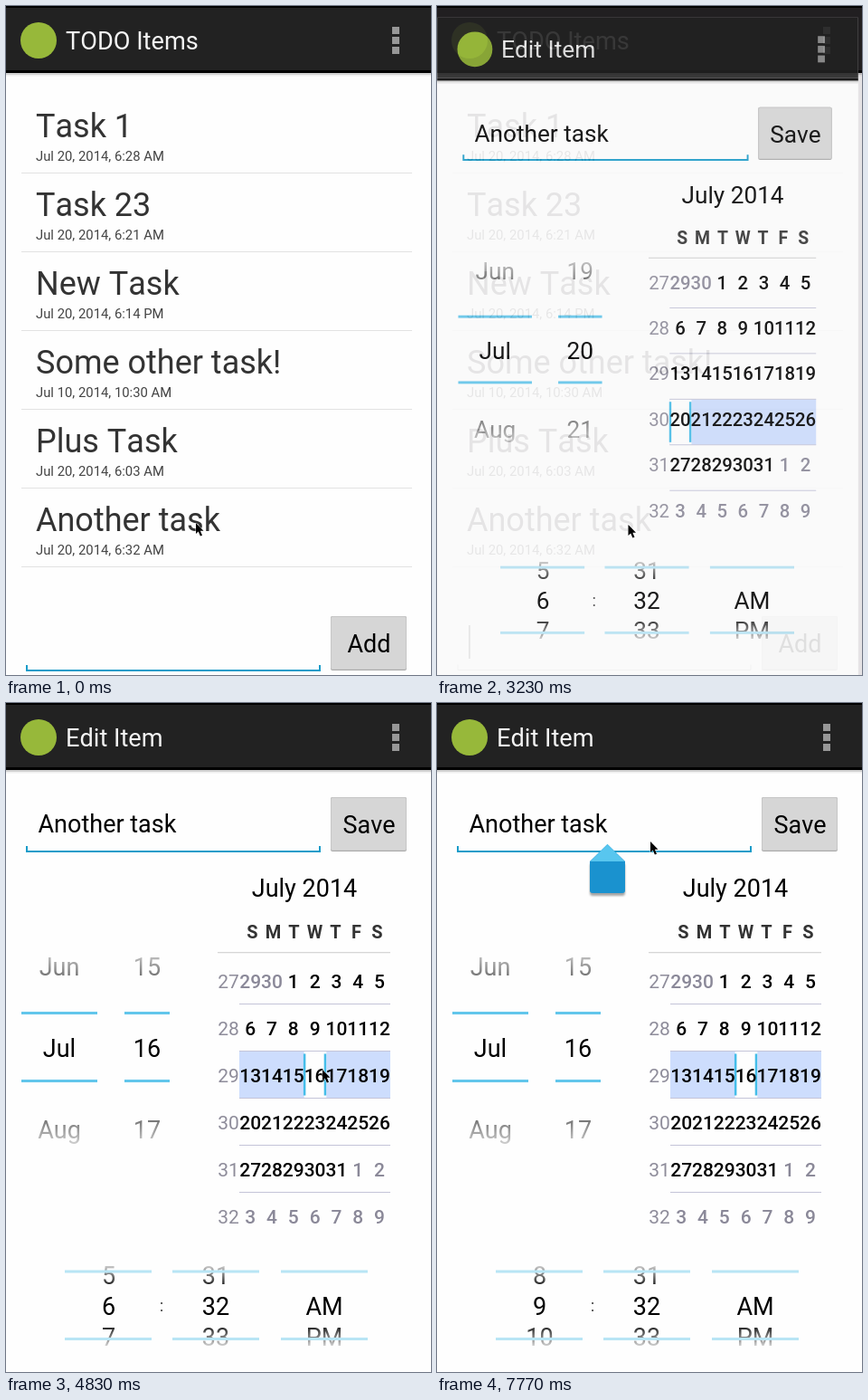
Animation, 470 px wide and 739 px high, one loop 8 s. Source, as an HTML page:

```html
<!DOCTYPE html>
<html lang="en">
<head>
<meta charset="utf-8">
<title>TODO Items</title>
<style>
html, body { margin: 0; width: 100%; height: 100%; overflow: hidden; background: #fefefe; }
svg { display: block; width: 100vw; height: 100vh; }
text { font-family: Roboto, sans-serif; font-size: 27px; font-kerning: none; fill: #000; white-space: pre; }
.title { font-size: 27.2px; fill: #f3f3f3; }
.task { font-size: 36px; fill: #333; }
.date { font-size: 14.85px; fill: #444; }
.day { font-size: 21px; font-weight: 500; }
.week { font-size: 21px; fill: #8e8c9a; }
.head { font-size: 20px; font-weight: 700; fill: #333; }
.mid { text-anchor: middle; }
</style>
</head>
<body>
<svg id="stage" viewBox="0 0 470 739" xmlns="http://www.w3.org/2000/svg"></svg>
<script>
const LOOP = 8000;
const range = n => [...Array(n).keys()];
const rect = (x, y, w, h, fill, more = '') =>
  `<rect x="${x}" y="${y}" width="${w}" height="${h}" fill="${fill}" ${more}/>`;
const text = (x, y, str, cls = '', more = '') =>
  `<text x="${x}" y="${y}" class="${cls}" ${more}>${str}</text>`;

// The phone screen is 480 wide and a little larger than the stage
const screenBack = () => rect(-7, 2, 480, 762, '#fefefe');

const header = title =>
  rect(-7, 2, 480, 69, '#222') + rect(-7, 71, 480, 3, '#000') +
  rect(-7, 74, 480, 2, '#d2d2d2') + rect(-7, 76, 480, 1.5, '#f0f0f0') +
  '<circle cx="36" cy="38" r="20" fill="#97b83a"/>' +
  text(66, 48, title, 'title') +
  [23, 34, 45].map(y => rect(427, y, 8, 8, '#979797')).join('');

const button = (y, label) =>
  rect(359, y, 84, 60, '#a9a9a9', 'rx="2"') +
  rect(359, y, 84, 59, '#c6c6c6', 'rx="2"') +
  rect(360, y + 1, 82, 57.5, '#d6d6d6', 'rx="1"') +
  text(401.5, y + 40, label, 'mid');

const underline = (y, color, w, id) =>
  `<path id="${id}" d="M23 ${y - 6}V${y}H347V${y - 6}" fill="none" stroke="${color}" stroke-width="${w}"/>`;

const caret = (id, y) => rect(35.2, y, 1.4, 37, '#111', `id="${id}"`);

// Task list screen
const tasks = [
  ['Task 1', '20, 2014, 6:28 AM'],
  ['Task 23', '20, 2014, 6:21 AM'],
  ['New Task', '20, 2014, 6:14 PM'],
  ['Some other task!', '10, 2014, 10:30 AM'],
  ['Plus Task', '20, 2014, 6:03 AM'],
  ['Another task', '20, 2014, 6:32 AM']
];
const listScreen = () =>
  screenBack() + header('TODO Items') +
  tasks.map(([name, date], i) =>
    text(33, 145 + 87 * i, name, 'task') +
    text(33, 171 + 87 * i, 'Jul ' + date, 'date') +
    rect(17, 184 + 87 * i, 432, 1, '#e2e2e2')).join('') +
  underline(734, '#1a9cc9', 2, 'lineOn') +
  underline(733.5, '#b2b2b2', 1, 'lineOff') +
  caret('listCaret', 684) + button(674, 'Add');

// Edit screen
const dayCell = n => {
  const d = n - 1;
  return d < 1 ? [d + 30, 0] : d > 31 ? [d - 31, 0] : [d, 1];
};
const colX = c => 270.2 + 23.8 * c;

const calendar = () =>
  text(330, 214, 'July 2014', 'mid') +
  [...'SMTWTFS'].map((s, c) => text(272.5 + 23 * c, 260, s, 'head mid')).join('') +
  rect(234, 275, 191, 1.3, '#d6d6d6') +
  '<g id="band"></g>' +
  range(5).map(r => rect(258, 332 + 52 * r, 167, 1, '#c4c4d8')).join('') +
  '<g id="bars"></g><g id="days">' +
  range(6).map(r =>
    text(246, 315 + 52 * r, 27 + r, 'week mid') +
    range(7).map(c => {
      const [d, inside] = dayCell(r * 7 + c);
      return text(colX(c), 315 + 52 * r, d, 'day mid', inside ? '' : 'style="fill:#8a8898"');
    }).join('')).join('') + '</g>';

const dateWheels = () =>
  ['Jun', 'Jul', 'Aug'].map((m, i) => text(59, 300.5 + 90 * i, m, 'mid')).join('') +
  '<g id="dayWheel"></g>' +
  rect(15, 270, 170, 66, 'url(#fadeTop)') + rect(15, 426, 170, 66, 'url(#fadeBottom)') +
  [341, 416].map(y => rect(17, y, 84, 3, '#62c6eb') + rect(131, y, 50, 3, '#62c6eb')).join('');

const timeWheels = () =>
  '<g clip-path="url(#wheelClip)"><g id="hourWheel"></g>' +
  ['31', '32', '33'].map((m, i) => text(232, 641.5 + 34 * i, m, 'mid')).join('') +
  text(352, 675.5, 'AM', 'mid') + text(352, 709.5, 'PM', 'mid') +
  rect(60, 619, 345, 28, 'url(#fadeTop)') + rect(60, 685, 345, 27, 'url(#fadeBottom)') + '</g>' +
  text(172, 672, ':', 'mid', 'style="font-size:19px;fill:#444"') +
  [626.5, 701].map(y => [65, 184, 304].map(x => rect(x, y, 96, 3, '#b8e5f5')).join('')).join('');

const handle = () =>
  '<g id="handle">' +
  '<path d="M169 178H208V210Q208 213 205 213H172Q169 213 169 210Z" fill="#000" opacity=".35" filter="url(#soft)"/>' +
  '<path d="M188.5 156L208 175V207Q208 210 205 210H172Q169 210 169 207V175Z" fill="#1a92cf"/>' +
  '<path d="M188.5 156L207.5 175H169.5Z" fill="#58c6ef"/></g>';

const editScreen = () =>
  screenBack() + header('Edit Item') + text(35.5, 143, 'Another task') +
  underline(164, '#1a9cc9', 2, 'editLine') + caret('editCaret', 114) +
  button(104, 'Save') + dateWheels() + calendar() + timeWheels() + handle();

const stops = (a, b) =>
  `<stop offset="0" stop-color="#fefefe" stop-opacity="${a}"/><stop offset="1" stop-color="#fefefe" stop-opacity="${b}"/>`;
document.getElementById('stage').innerHTML =
  `<defs>
    <linearGradient id="fadeTop" x2="0" y2="1">${stops(.88, 0)}</linearGradient>
    <linearGradient id="fadeBottom" x2="0" y2="1">${stops(0, .88)}</linearGradient>
    <clipPath id="wheelClip"><rect x="60" y="619" width="345" height="92"/></clipPath>
    <filter id="soft"><feGaussianBlur stdDeviation="1.2"/></filter>
  </defs>
  ${rect(0, 0, 470, 2, '#000')}
  <g id="list">${listScreen()}</g>
  ${rect(0, 2, 470, 737, '#1c0a1c', 'id="dim" opacity=".11"')}
  <g id="edit">${editScreen()}</g>
  <path id="mouse" d="M0 0V12L2.7 9.6L4.9 14.6L7 13.7L4.9 8.8H8.5Z" fill="#000" stroke="#fff" stroke-width=".8" paint-order="stroke"/>`;

const $ = id => document.getElementById(id);
const show = (id, on) => $(id).setAttribute('display', on ? 'inline' : 'none');

// Step tracks: [start time, ...values], each held until the next one
const mouseTrack = [
  [0, 210, 571], [540, 211.5, 573], [3760, 370, 452], [4030, 345.5, 367], [4300, 345.5, 420],
  [4570, 350, 405], [5100, 220.5, 636], [5370, 142, 669], [5630, 129, 668],
  [5900, 130.5, 556], [6440, 236.5, 260], [6700, 236, 163], [6970, 236, 153]
];
const openTrack = [[0, 0, 1], [2960, .5, .9], [3230, .88, .97], [3500, 1, 1]];
const hourTrack = [[0, 6], [5900, 8], [6170, 8.95], [6440, 8.98], [6700, 9]];
const listCaretTrack = [[0, 0], [540, 1], [1080, 0], [1880, 1]];
const editCaretTrack = [
  [0, 0, 0], [4030, 1, 0], [4570, 0, 0], [5100, 1, 0], [5630, 0, 0],
  [6440, 1, 0], [6970, 0, 152.5], [7240, 1, 152.5], [7770, 0, 152.5]
];
const at = (track, t) => track.filter(k => k[0] <= t).pop().slice(1);

function drawSelection(day) {
  const n = day + 1, y = 280.5 + 52 * Math.floor(n / 7), x = 258.3 + 23.8 * (n % 7);
  $('band').innerHTML = rect(258, y, 167, 52, '#cdddfd') + rect(x, y, 24.6, 52, '#fefefe');
  $('bars').innerHTML = [x - .8, x + 22].map(b => rect(b, y + 3, 2.5, 46, '#45bde9')).join('');
  $('dayWheel').innerHTML =
    [-1, 0, 1].map(i => text(156, 390.5 + 90 * i, day + i, 'mid')).join('');
}

function drawHours(pos) {
  const mid = Math.round(pos);
  $('hourWheel').innerHTML = [-1, 0, 1].map(i =>
    text(113.5, 675.5 + 34 * (mid + i - pos), mid + i, 'mid')).join('');
}

let last = '';
function render(t) {
  const [mx, my] = at(mouseTrack, t);
  const [alpha, scale] = at(openTrack, t);
  const [hour] = at(hourTrack, t);
  const [listCaret] = at(listCaretTrack, t);
  const [editCaret, caretX] = at(editCaretTrack, t);
  const picked = t >= 4830, focused = t < 1880, held = t >= 7500;
  const key = [mx, my, alpha, scale, hour, listCaret, editCaret, caretX, picked, focused, held].join();
  if (key === last) return;
  last = key;

  $('mouse').setAttribute('transform', `translate(${mx} ${my})`);
  show('list', alpha < 1);
  show('dim', alpha > 0 && alpha < 1);
  show('edit', alpha > 0);
  $('edit').setAttribute('opacity', alpha);
  $('edit').setAttribute('transform', `translate(233 364) scale(${scale}) translate(-233 -364)`);
  show('lineOn', focused);
  show('lineOff', !focused);
  show('listCaret', listCaret);
  show('editCaret', editCaret);
  $('editCaret').setAttribute('x', 35.2 + caretX);
  $('days').setAttribute('transform', `translate(0 ${picked ? 0 : -4})`);
  drawSelection(picked ? 16 : 20);
  drawHours(hour);
  show('handle', held);
}

function tick() {
  render(performance.now() % LOOP);
  requestAnimationFrame(tick);
}
tick();
</script>
</body>
</html>
```
